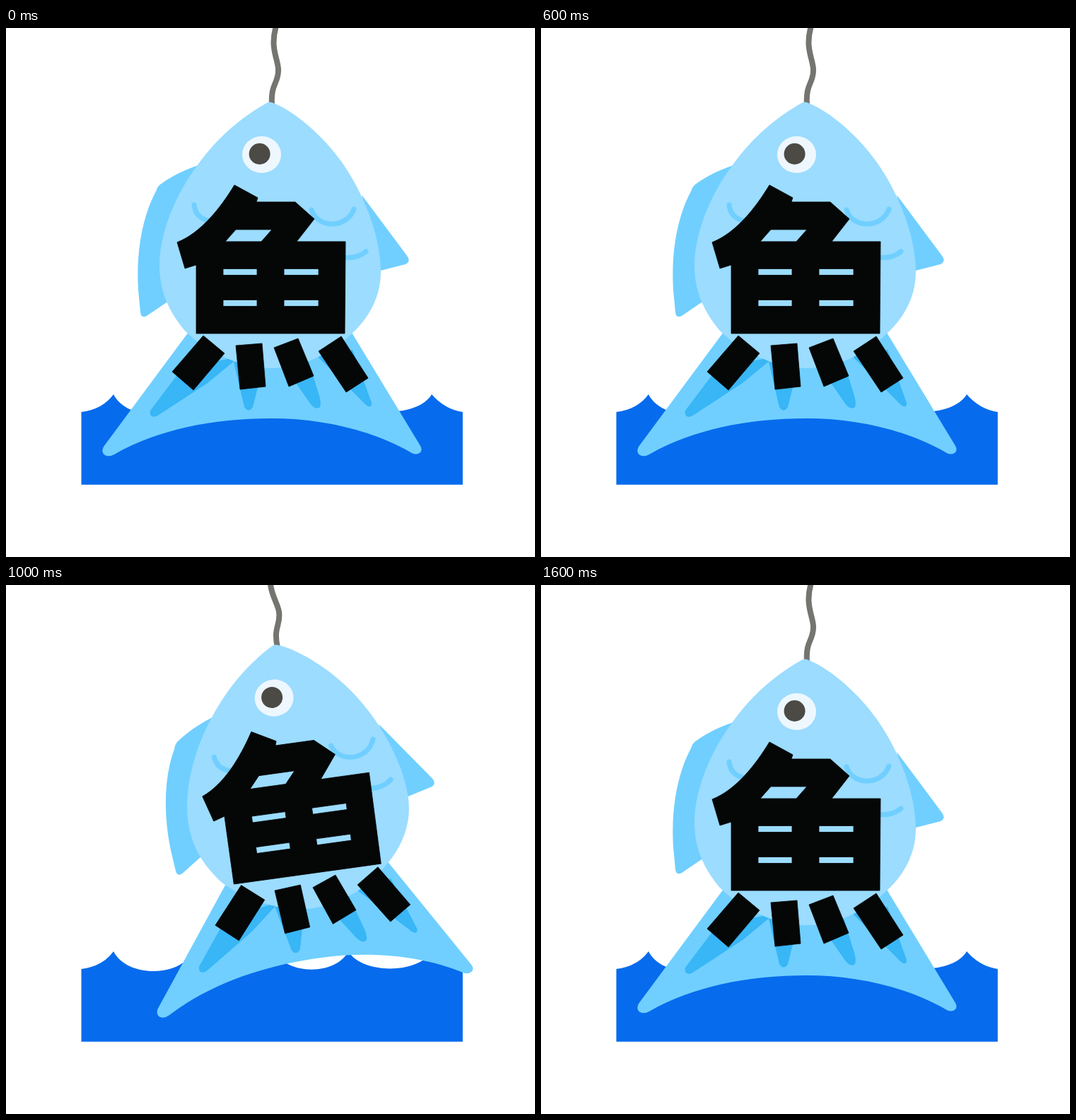
An HTML page for the animation above (2.6 s loop, 748 by 748 pixels).

```html
<!DOCTYPE html>
<html lang="ja">
<head>
<meta charset="utf-8">
<title>Fish on a line</title>
<style>
  html, body { margin: 0; width: 100%; height: 100%; overflow: hidden; background: #fff; }
  svg { display: block; width: 100%; height: 100%; }
</style>
</head>
<body>
<svg viewBox="0 0 748 748">
  <path id="sea" fill="#076bed"/>
  <g id="fish">
    <path d="M382 -3C373 28 384 42 385 58C386 78 374 78 376 108" fill="none" stroke="#747470" stroke-width="8"/>

    <g fill="#70cfff">
      <path d="M272 194Q240 205 217 222Q213 226 212 231C191 270 184 322 187 370L190 402Q191 411 199 407L230 386Z"/>
      <path d="M503 236L567 322Q573 330 565 334L526 344Z"/>
      <path d="M258 430L138 592Q134 600 140 604Q146 607 153 603C220 565 300 552 375 552C450 552 520 570 572 600Q580 605 586 600Q589 596 586 591L488.5 430Z"/>
    </g>

    <g fill="#38b6f6">
      <path d="M250 480L204 541Q202 552 213 549L285 502L330 465Z"/>
      <path d="M322 472L337 536Q343 545 349 536L358 500L362 472Z"/>
      <path d="M388 470L430 531Q438 541 444 536Q446 530 443 520L425 462Z"/>
      <path d="M436 460L509 533Q517 539 517 530L490 455Z"/>
    </g>

    <path fill="#9bdcff" d="M375 105C400 113 444 146 475 190C510 240 530 300 530 345C530 385 508 415 489 432C460 460 420 481 375 481C335 481 285 460 252 427C232 402 217 375 217 335C217 290 240 235 270 195C300 153 335 125 367 107Q371 104 375 105Z"/>

    <g fill="none" stroke="#70cfff" stroke-width="7" stroke-linecap="round">
      <path d="M266 250Q268 270 290 273"/>
      <path d="M432 257C440 284 482 284 492 256"/>
      <path d="M509 316Q496 327 476 324"/>
    </g>

    <ellipse cx="361.5" cy="179" rx="27.5" ry="26" fill="#eef7fe"/>
    <circle cx="358.6" cy="178" r="15" fill="#4b4a45"/>

    <g fill="#050606" stroke="#050606" stroke-width="0.8">
      <path fill-rule="evenodd" d="M323 222L356 240L354 246H409L436 270L411 302H480L479 432H269V335L253 340L242 303C275 290 303 255 323 222Z
        M325 285H376L361 302H310Z
        M307 340.5h48v9h-48Z M393 340.5h49v9h-49Z
        M307 384.5h48v9h-48Z M393 384.5h49v9h-49Z"/>
      <path d="M279 435L309 460L265 512L235 486Z"/>
      <path d="M325 449L362 446L367 507L331 511Z"/>
      <path d="M379 452L413 439L435 492L400 507Z"/>
      <path d="M442 457L474 436L512 495L481 515Z"/>
    </g>
  </g>
</svg>
<script>
  const LOOP = 2600;
  const STEP = 200;
  const NOSE = { x: 375, y: 105 };
  const REST = { x: 375, y: 105, turn: 0 };

  // Nose position and tilt for each step; the last pose holds to the loop's end.
  const poses = [
    REST,
    { x: 369.6, y: 98, turn: 2.75 },
    { x: 364.2, y: 94.4, turn: 6.3 },
    REST,
    { x: 378.7, y: 89.8, turn: -4 },
    { x: 382.3, y: 84.5, turn: -7.9 },
    { x: 380.3, y: 81.7, turn: -5.5 },
    { x: 377.8, y: 79.5, turn: -3.1 },
    REST
  ];

  // Waves grow slightly shallower to the right.
  function seaPath() {
    const crests = [152, 265, 380, 484, 602];
    const top = 518;
    let d = `M106.5 543Q137 539 ${crests[0]} ${top}`;
    for (let i = 1; i < crests.length; i++) {
      const from = crests[i - 1], to = crests[i];
      const inset = (to - from) / 6;
      const dip = 557 - 1.6 * i;
      d += `C${from + inset} ${dip} ${to - inset} ${dip} ${to} ${top}`;
    }
    return d + 'Q620 539 645.8 543V645.8H106.5Z';
  }

  const fish = document.getElementById('fish');
  document.getElementById('sea').setAttribute('d', seaPath());

  function draw(ms) {
    const step = Math.min(Math.floor((ms % LOOP) / STEP), poses.length - 1);
    const { x, y, turn } = poses[step];
    fish.setAttribute('transform',
      `translate(${x} ${y}) rotate(${turn}) translate(${-NOSE.x} ${-NOSE.y})`);
  }

  const start = performance.now();
  function tick() {
    draw(performance.now() - start);
    requestAnimationFrame(tick);
  }
  tick();
</script>
</body>
</html>
```
